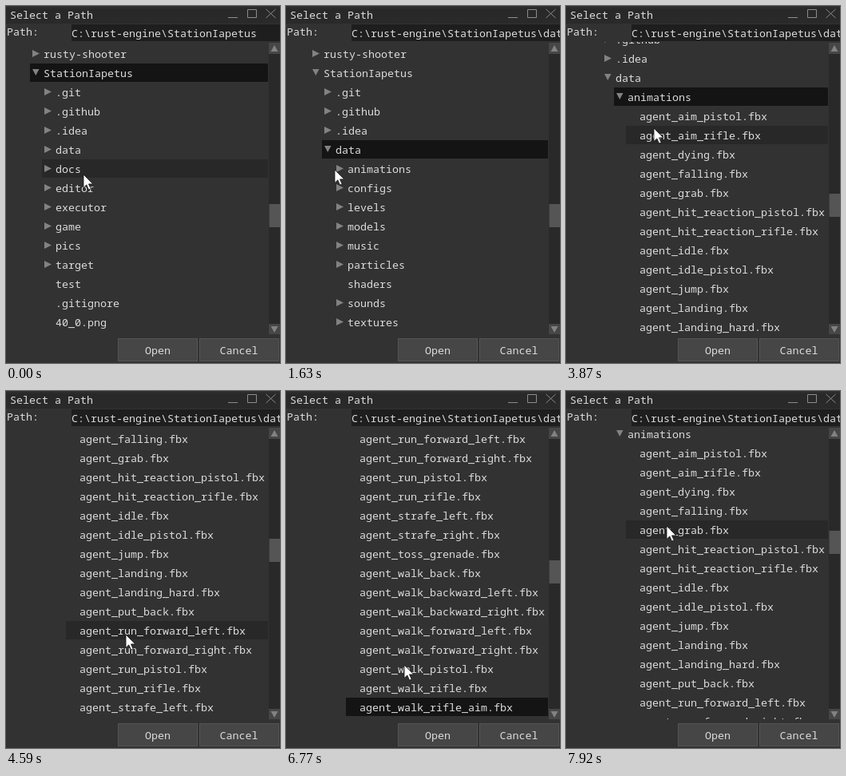
An HTML page that plays this animation: 343 px wide and 447 px high, repeating every 7990 ms.

```html
<!DOCTYPE html>
<html lang="en">
<head>
<meta charset="utf-8">
<title>Select a Path</title>
<style>
  html, body { margin: 0; width: 100%; height: 100%; overflow: hidden; background: #323232; }
  svg { display: block; }
  text { font: 13.333px "Noto Sans Mono", "DejaVu Sans Mono", monospace; fill: #dcdcdc; white-space: pre; }
  .mark { fill: none; stroke: #8c8c8c; }
  .arrow { fill: #828282; }
  .button { fill: #464646; stroke: #545454; }
</style>
</head>
<body>
<svg width="343" height="447" viewBox="0 0 343 447">
  <defs>
    <clipPath id="view"><rect y="45" width="328" height="366"/></clipPath>
    <linearGradient id="bar" x2="0" y2="1">
      <stop stop-color="#303030"/><stop offset=".2" stop-color="#282828"/><stop offset="1" stop-color="#2a2a2a"/>
    </linearGradient>
  </defs>
  <rect width="343" height="447" fill="#323232"/>
  <rect width="343" height="22" fill="url(#bar)"/>
  <text x="5" y="16">Select a Path</text>
  <path class="mark" d="M278 14.5h12M302.5 4.5h11v10h-11zM325.500 4l12 11M337.500 4l-12 11"/>
  <text x="1" y="37">Path:</text>
  <rect x="82" y="23" width="261" height="21" fill="#1e1e1e"/>
  <text id="path" x="82" y="39"></text>

  <g id="tree" clip-path="url(#view)"></g>

  <rect x="329" y="46" width="14" height="365" fill="#292929"/>
  <path d="M329 46h14v14h-14zM329 398h14v13h-14z" fill="#464646"/>
  <path class="arrow" d="M336 49l4.500 8h-9zM336 409l4.500-8h-9z"/>
  <rect id="thumb" x="329.500" width="14" height="29" fill="#555"/>

  <rect class="button" x="140.500" y="416.500" width="99" height="28"/>
  <rect class="button" x="242.500" y="416.500" width="99" height="28"/>
  <text x="190" y="436" text-anchor="middle">Open</text>
  <text x="291.500" y="436" text-anchor="middle">Cancel</text>

  <path id="cursor" d="M0 0v16.500l3.800-3.600 2.700 6.200 2.700-1.200-2.700-6h5.300z" fill="#fff" stroke="#111" stroke-width=".8"/>
</svg>
<script>
const LOOP = 7990, ROW = 24, TOP = 60;
const DATA_OPEN = 1480, ANIM_OPEN = 3250;
const $ = id => document.getElementById(id);

function add(parent, tag, attrs) {
  const el = document.createElementNS('http://www.w3.org/2000/svg', tag);
  for (const key in attrs) el.setAttribute(key, attrs[key]);
  return parent.appendChild(el);
}

// Each row: depth, name, whether it has an expander, when it appears and opens.
const rows = [];
function list(depth, names, from = 0, prefix = '', suffix = '') {
  for (const word of names.split(' ')) {
    const folder = word.endsWith('/');
    rows.push({ depth, from, folder, name: prefix + word.replace('/', '') + suffix, opens: Infinity });
  }
}
list(0, 'rusty-shooter/ StationIapetus/');
list(1, '.git/ .github/ .idea/ data/');
list(2, 'animations/', DATA_OPEN);
list(3, 'aim_pistol aim_rifle dying falling grab hit_reaction_pistol hit_reaction_rifle idle idle_pistol ' +
  'jump landing landing_hard put_back run_forward_left run_forward_right run_pistol run_rifle ' +
  'strafe_left strafe_right toss_grenade walk_back walk_backward_left walk_backward_right ' +
  'walk_forward_left walk_forward_right walk_pistol walk_rifle walk_rifle_aim', ANIM_OPEN, 'agent_', '.fbx');
list(3, 'attack dying idle', ANIM_OPEN, 'bot_', '.fbx');
list(2, 'configs/ levels/ models/ music/ particles/ shaders sounds/ textures/ ui/', DATA_OPEN);
list(1, 'docs/ editor/ executor/ game/ pics/ target/ test .gitignore 40_0.png');

const opening = { StationIapetus: 0, data: DATA_OPEN, animations: ANIM_OPEN };
for (const row of rows) {
  if (row.name in opening) row.opens = opening[row.name];
  const x = 47 + 15 * row.depth;
  row.group = add($('tree'), 'g', {});
  row.back = add(row.group, 'rect', { x: x - 17, y: -12, width: 345 - x, height: 23 });
  if (row.folder) row.arrow = add(row.group, 'path', { class: 'arrow' });
  row.closedShape = `M${x - 14} -5l9 4.500l-9 4.500z`;
  row.openShape = `M${x - 14} -5h8.500l-4.250 8z`;
  add(row.group, 'text', { x, y: 4.5 }).textContent = row.name;
}

// Hard changes: [time, value]
const scrolls = [[0, 0], [1800, 30], [1880, 60], [1960, 90], [4420, 120], [4490, 240], [4660, 360],
  [5000, 390], [5750, 420], [5830, 480], [5910, 540], [6690, 510], [6770, 480]];
for (let i = 1; i <= 11; i++) scrolls.push([6920 + 76 * (i - 1), 480 - 30 * i]);
const ranges = [[0, 1428], [1800, 1692], [4420, 2738]];
const selections = [[0, 'StationIapetus'], [690, ''], [1010, 'data'], [ANIM_OPEN, 'animations'],
  [5750, 'agent_walk_backward_left.fbx'], [6220, 'agent_walk_rifle_aim.fbx']];
const hovers = [[0, true], [1010, false], [3490, true], [5750, false], [7150, true]];

// Pointer path: [time, x, y]
const pointer = [[0, 97, 211], [70, 97, 211], [690, 70, 178], [1010, 70, 178], [1160, 51, 179], [1400, 51, 179],
  [1630, 61, 205], [2260, 94, 252], [3100, 68, 117], [3330, 68, 117], [3640, 110, 153], [3900, 110, 153],
  [4400, 150, 305], [4830, 150, 305], [5360, 148, 343], [6920, 148, 343], [7690, 126, 169], [LOOP, 126, 169]];

const stepAt = (keys, t) => keys.filter(k => k[0] <= t).pop()[1];

function pointAt(t) {
  const i = pointer.findIndex(k => k[0] > t);
  const [t0, x0, y0] = pointer[i - 1], [t1, x1, y1] = pointer[i];
  const u = (t - t0) / (t1 - t0), e = u * u * (3 - 2 * u);
  return [x0 + (x1 - x0) * e, y0 + (y1 - y0) * e];
}

function render(t) {
  const scroll = stepAt(scrolls, t), selected = stepAt(selections, t), hovering = stepAt(hovers, t);
  const [px, py] = pointAt(t);
  let y = TOP - scroll;
  for (const row of rows) {
    const shown = t >= row.from;
    row.group.style.display = shown && y > 25 && y < 430 ? '' : 'none';
    if (!shown) continue;
    row.group.setAttribute('transform', `translate(0 ${y})`);
    const hovered = hovering && py >= y - 12 && py < y + 12;
    row.back.setAttribute('fill', row.name === selected ? '#141414' : hovered ? '#282828' : 'none');
    if (row.arrow) row.arrow.setAttribute('d', t >= row.opens ? row.openShape : row.closedShape);
    y += ROW;
  }
  $('path').textContent = 'C:\\rust-engine\\StationIapetus' +
    (t < 690 ? '' : '\\data') + (t < ANIM_OPEN ? '' : '\\animations');
  $('thumb').setAttribute('y', Math.round(60 + 308 * (871 + scroll) / stepAt(ranges, t)));
  $('cursor').setAttribute('transform', `translate(${Math.round(px)} ${Math.round(py)})`);
}

const start = performance.now();
function tick() {
  render((performance.now() - start) % LOOP);
  requestAnimationFrame(tick);
}
tick();
</script>
</body>
</html>
```
